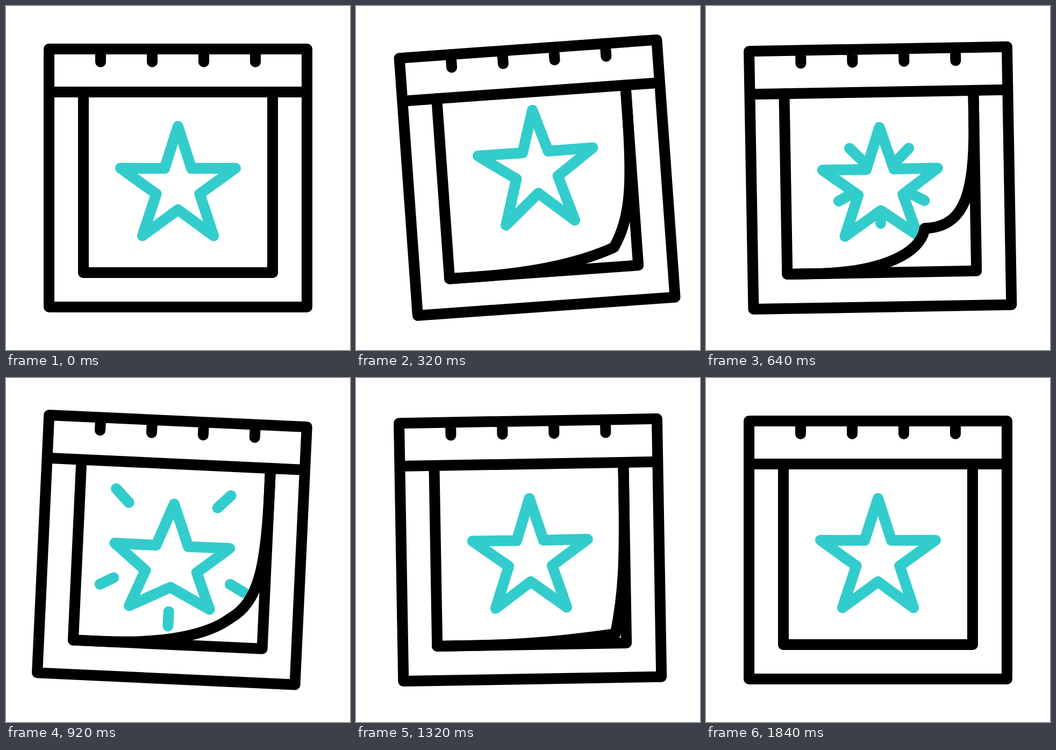
Animation, 640 px wide and 640 px high, one loop 2 s. Source, as an HTML page:

```html
<!DOCTYPE html>
<html lang="en">
<head>
<meta charset="utf-8">
<title>Calendar with star</title>
<style>
  html, body { margin: 0; width: 100%; height: 100%; overflow: hidden; background: #fff; }
  svg { display: block; width: 100%; height: 100%; }
  path { fill: none; stroke: #000; stroke-width: 20; stroke-linecap: round; stroke-linejoin: round; }
  .accent path { stroke: #33cccc; }
  #star { fill: #fff; }
</style>
</head>
<body>
<svg viewBox="0 0 640 640">
  <defs><clipPath id="sheet"><path id="sheetShape"/></clipPath></defs>
  <g id="calendar">
    <path d="M144 160V496H496V160"/>
    <g class="accent" clip-path="url(#sheet)">
      <path id="rays"/>
      <path id="star"/>
    </g>
    <path id="curl"/>
    <path d="M80 80H560V560H80ZM80 160H560M176 80V104M272 80V104M368 80V104M464 80V104"/>
  </g>
</svg>
<script>
const LOOP = 2000, STEP = 40, END = 1840;
const CX = 320, STAR_Y = 336.5, RAY_Y = 320;
const $ = id => document.getElementById(id);

const ramp = (t, a, b) => Math.min(1, Math.max(0, (t - a) / (b - a)));
const ease = (t, a, b) => { const x = ramp(t, a, b); return x * x * (3 - 2 * x); };
const bump = (t, a, peak, b) => ease(t, a, peak) - ease(t, peak, b);

// Damped swing about the top edge, in degrees
const swing = t =>
  -5 * ease(t, 0, 440) + 8 * ease(t, 440, 840) - 4 * ease(t, 840, 1280) + ease(t, 1280, 1840);

const curl = t => Math.min(ramp(t, 0, 640), 1 - ramp(t, 640, 1560)) ** 1.15;

// Five-pointed star; its feet stay down while the body squashes
function starPath(jump, squash) {
  const points = [];
  for (let i = 0; i < 10; i++) {
    const angle = i * Math.PI / 5, r = i % 2 ? 42.5 : 112.5;
    const x = r * Math.sin(angle), y = STAR_Y - r * Math.cos(angle);
    const foot = i === 4 || i === 6;
    const spread = x * (1 - (x / 107) ** 2) * (.22 * squash - .05 * jump);
    const shift = foot ? -24 * jump : 11 * squash - 30.5 * jump;
    points.push([CX + x + spread, y + shift]);
  }
  return 'M' + points.join('L') + 'Z';
}

// Ray tips, measured from the burst centre
const RAY_TIPS = [[-109, -109], [105, -106], [-131, 70], [137, 73], [-1, 142]];

function rayPath(head, tail, lift) {
  if (head <= tail) return '';
  return RAY_TIPS.map(([x, y]) => {
    const start = y > 0 ? .19 : .03;
    const point = k => {
      const f = start + (1 - start) * k;
      return [CX + x * f, RAY_Y + y * f + lift];
    };
    return 'M' + point(tail) + 'L' + point(head);
  }).join('');
}

// Right and bottom edges of the sheet, meeting at the lifted corner
function curlEdge(w) {
  const x = 496 - 95 * w, y = 496 - 81 * w;
  const side = [x + 80 * w, y - 96 * (1 - w)];
  const base = [x - 7 - 89 * (1 - w), y + 46 * w];
  return `M496 160V205C496 340 ${side} ${x},${y}C${base} 320 496 195 496H144`;
}

function draw(t) {
  const jump = bump(t, 0, 300, 560), squash = bump(t, 560, 880, 1220);
  const edge = curlEdge(curl(t));
  $('calendar').setAttribute('transform', `rotate(${swing(t)} ${CX} 80)`);
  $('star').setAttribute('d', starPath(jump, squash));
  $('rays').setAttribute('d', rayPath(ease(t, 440, 840), ease(t, 440, 1140), -31 * jump));
  $('curl').setAttribute('d', edge);
  $('sheetShape').setAttribute('d', edge + 'V160Z');
}

const begin = performance.now();
function tick() {
  const t = (performance.now() - begin) % LOOP;
  draw(Math.min(Math.floor(t / STEP) * STEP, END));
  requestAnimationFrame(tick);
}
tick();
</script>
</body>
</html>
```
